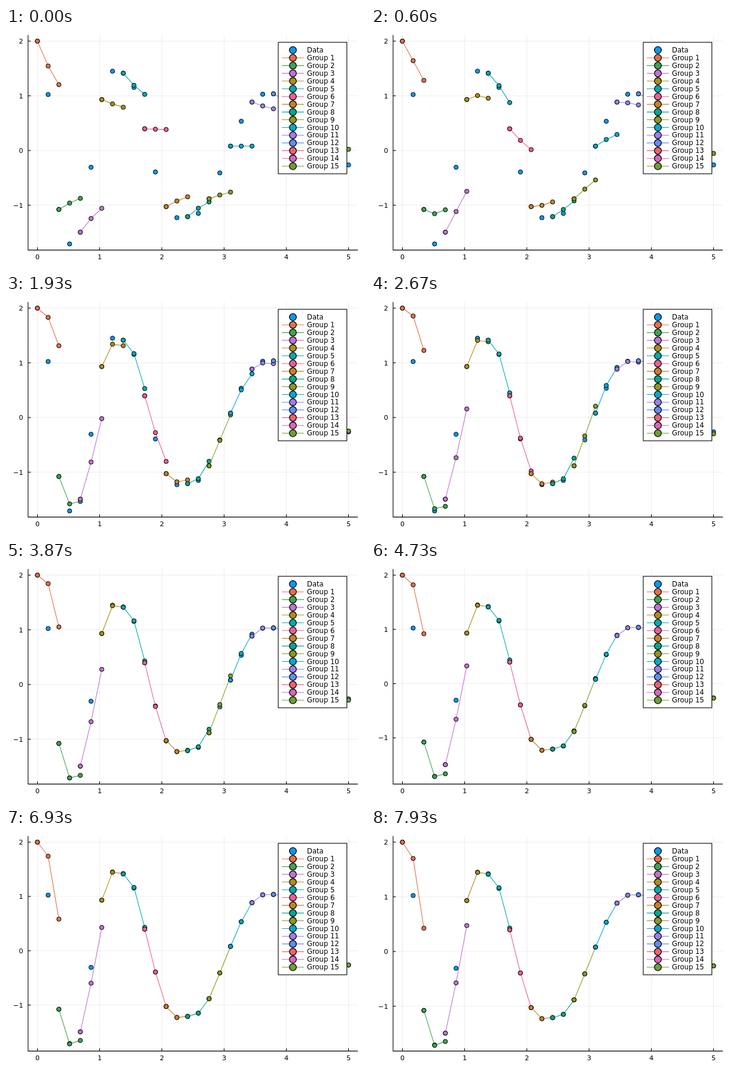
These frames come from a looping animation (600 by 400 pixels, 8 s). An HTML page with a canvas:

```html
<!DOCTYPE html>
<html lang="en">
<head>
<meta charset="utf-8">
<title>Group fits</title>
<style>
  html, body { margin: 0; width: 100%; height: 100%; overflow: hidden; background: #fff; }
  canvas { display: block; width: 600px; height: 400px; }
</style>
</head>
<body>
<canvas id="plot" width="600" height="400"></canvas>
<script>
const ctx = document.getElementById('plot').getContext('2d');
const DATA_COLOR = '#009afa';
const COLORS = ['#e36f47', '#3ea44e', '#c371d2', '#ac8e18', '#00aaae', '#ed5e93', '#c68225',
  '#00a98d', '#8e971e', '#00a9cc', '#9b7fe9', '#618df6', '#f06073', '#dd65b6', '#6d9f33'];
const LOOP = 8000, STEPS = 120;
const LAST = 29, DT = 5 / LAST, FINE = 400;
const TOP = 22, HEIGHT = 339.4;
const BOX = { left: 36.9, right: 588.1, top: 11.8, bottom: 371.6 };

// The true system is a damped cubic oscillator, solved with fourth-order Runge-Kutta.
const slope = ([u, v]) => [-0.1 * u ** 3 - 2 * v ** 3, 2 * u ** 3 - 0.1 * v ** 3];
const move = (a, d, h) => a.map((x, i) => x + d[i] * h);

function solve() {
  const h = DT / FINE, curve = [];
  for (let n = 0, a = [2, 0]; n <= FINE * (LAST + 1); n++) {
    curve.push(a[0]);
    const k1 = slope(a);
    const k2 = slope(move(a, k1, h / 2));
    const k3 = slope(move(a, k2, h / 2));
    const k4 = slope(move(a, k3, h));
    a = a.map((x, i) => x + h / 6 * (k1[i] + 2 * k2[i] + 2 * k3[i] + k4[i]));
  }
  return curve;
}

const curve = solve();
const truth = i => curve[Math.round(i * FINE)];
const data = Array.from({ length: LAST + 1 }, (_, i) => truth(i));
const lowest = Math.min(...data);

// Height of a group's n-th point: an untrained decay turns into the true curve,
// run too slowly where the motion is strong and briefly too fast in later groups.
function fitAt(start, n, step) {
  const u = data[start], t = start * DT;
  const untrained = u - 0.125 * u ** 3 / (1 + 0.3 * u * u) * (n === 2 ? 1.75 : n);
  const strength = Math.abs(u) / 2 * Math.exp(-(t ** 3));
  const lag = strength * (0.64 - 0.0023 * step);
  const lead = 0.2 * Math.exp(-(((step - 40) / 20) ** 2)) * Math.min(1, t / 2.5) ** 4;
  const trained = truth(start + n * (1 - lag + lead));
  const learned = 1 - Math.exp(-((step / 20) ** 1.5));
  return untrained + (trained - untrained) * learned;
}

// Once trained, the fit swings past the trough and the axis gives way.
const sag = step => step > 50 ? 0.03 * Math.max(0, Math.sin((step - 62) * Math.PI / 18)) : 0;

const px = v => 52.5 + 104 * v;

function path(points, color, width = 1.1) {
  ctx.beginPath();
  points.forEach(([x, y]) => ctx.lineTo(x, y));
  ctx.strokeStyle = color;
  ctx.lineWidth = width;
  ctx.stroke();
}

function dot(x, y, color, r = 3.6, width = 1) {
  ctx.beginPath();
  ctx.arc(x, y, r, 0, Math.PI * 2);
  ctx.fillStyle = color;
  ctx.fill();
  ctx.strokeStyle = '#000';
  ctx.lineWidth = width;
  ctx.stroke();
}

function label(text, x, y, align, size) {
  ctx.font = size + 'px "DejaVu Sans", sans-serif';
  ctx.fillStyle = '#000';
  ctx.textAlign = align;
  ctx.fillText(text, x, y);
}

function drawAxes(toY) {
  const { left, right, top, bottom } = BOX;
  const xs = [0, 1, 2, 3, 4, 5].map(v => [v, px(v)]);
  const ys = [-1, 0, 1, 2].map(v => [v, toY(v)]);
  xs.forEach(([, x]) => path([[x, top], [x, bottom]], 'rgba(0,0,0,.1)', 0.7));
  ys.forEach(([, y]) => path([[left, y], [right, y]], 'rgba(0,0,0,.1)', 0.7));
  path([[left, top], [left, bottom], [right, bottom]], '#000');
  xs.forEach(([v, x]) => {
    path([[x, bottom], [x, bottom - 4.5]], '#000');
    label(v, x, 387, 'center', 11.3);
  });
  ys.forEach(([v, y]) => {
    path([[left, y], [left + 4.5, y]], '#000');
    label(String(v).replace('-', '\u2212'), 28.6, y + 4, 'right', 11.3);
  });
}

function drawLegend() {
  ctx.fillStyle = '#fff';
  ctx.fillRect(455, 24, 114.7, 220);
  ctx.strokeStyle = '#000';
  ctx.lineWidth = 1.1;
  ctx.strokeRect(455, 24, 114.7, 220);
  [DATA_COLOR, ...COLORS].forEach((color, n) => {
    const y = 37 + n * 12.95;
    if (n) path([[461, y], [498, y]], color);
    dot(479.5, y, color, 5.8, 1.3);
    label(n ? 'Group ' + n : 'Data', 503, y + 4, 'left', 11.6);
  });
}

function draw(step) {
  const low = lowest - sag(step);
  const toY = v => TOP + (2 - v) * HEIGHT / (2 - low);

  ctx.fillStyle = '#fff';
  ctx.fillRect(0, 0, 600, 400);
  drawAxes(toY);
  data.forEach((v, i) => dot(px(i * DT), toY(v), DATA_COLOR));
  COLORS.forEach((color, g) => {
    const start = 2 * g;
    const points = [0, 1, 2]
      .filter(n => start + n <= LAST)
      .map(n => [px((start + n) * DT), toY(n ? fitAt(start, n, step) : data[start])]);
    path(points, color);
    points.forEach(([x, y]) => dot(x, y, color));
  });
  drawLegend();
}

const begin = performance.now();
function tick() {
  const t = (performance.now() - begin) % LOOP;
  draw(Math.floor((t + 3.4) * STEPS / LOOP) % STEPS);
  requestAnimationFrame(tick);
}
tick();
</script>
</body>
</html>
```
